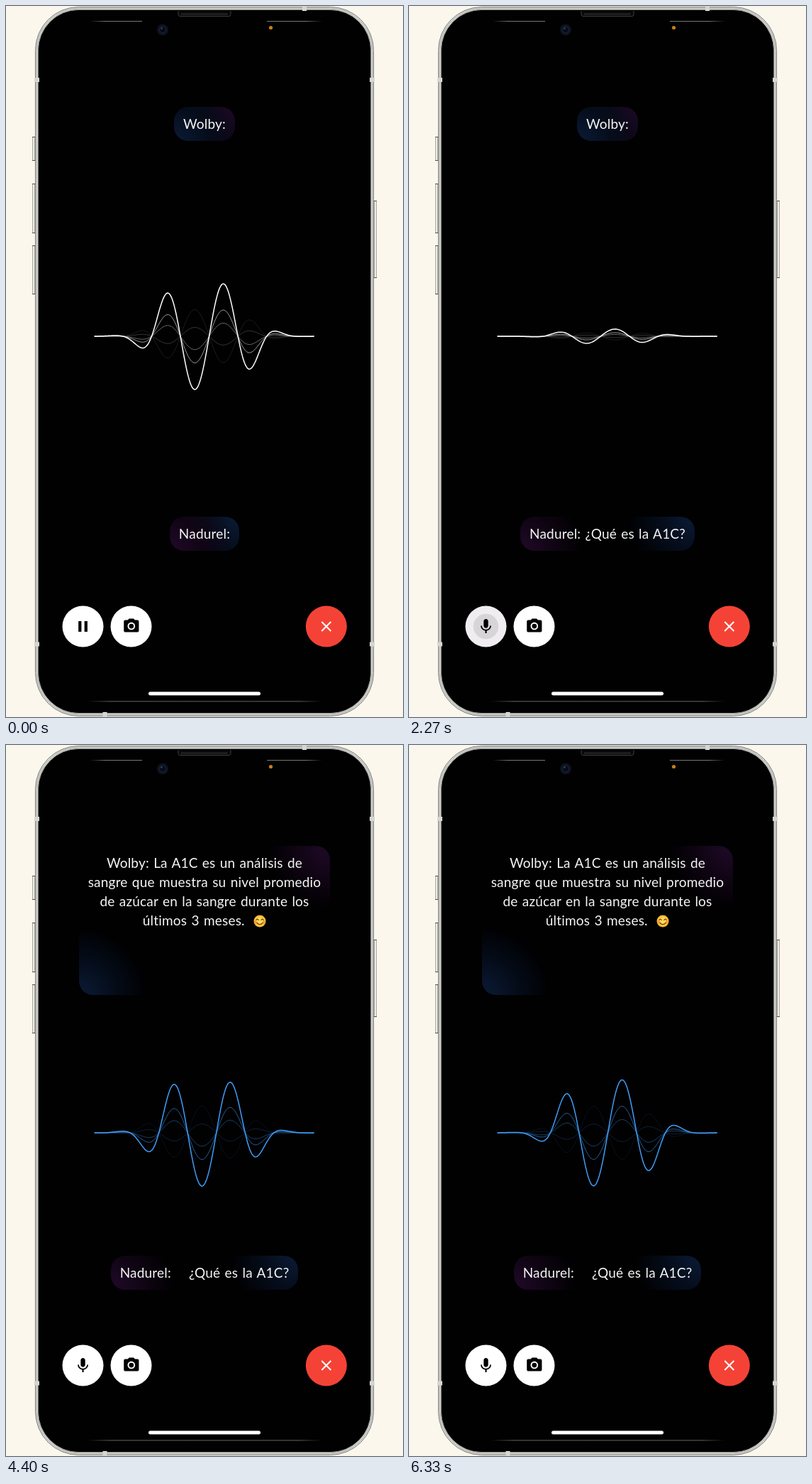
Recreate the animation shown at these times as an HTML page. Size 560 by 1001 pixels, loop 6.39 s.

```html
<!DOCTYPE html>
<html lang="es">
<meta charset="utf-8">
<title>Voice assistant</title>
<style>
  html, body { margin: 0; width: 100%; height: 100%; overflow: hidden; background: #fbf7ed; }
  #stage { position: relative; width: 560px; height: 1001px; overflow: hidden; }
  #stage > svg { position: absolute; left: 0; top: 0; }
  .bubble {
    position: absolute; left: 0; right: 0; margin: auto; width: fit-content; height: 48px;
    box-sizing: border-box; padding: 9.5px 13px; border-radius: 20px;
    font: 19px/27px Lato, "Open Sans", sans-serif; letter-spacing: .2px; word-spacing: 1.2px;
    color: #f5f5f5; text-align: center; white-space: pre;
    --blue: #0b1b36, #050d1b 50%, transparent;
    --plum: #21092a, #110515 50%, transparent;
  }
  #bot { top: 142px; background:
    radial-gradient(circle 96px at 0 100%, var(--blue)),
    radial-gradient(circle 90px at 100% 0, var(--plum)); }
  #user { top: 719px; background:
    radial-gradient(circle 90px at 0 100%, var(--plum)),
    radial-gradient(circle 96px at 100% 0, var(--blue)); }
  .smile { width: 18px; height: 18px; vertical-align: -3px; }
</style>
<div id="stage">
  <svg width="560" height="1001" fill="none">
    <defs>
      <linearGradient id="fadeL"><stop stop-color="#000"/><stop offset=".3" stop-color="#777"/></linearGradient>
      <linearGradient id="fadeR"><stop offset=".7" stop-color="#777"/><stop offset="1" stop-color="#000"/></linearGradient>
      <linearGradient id="fadeB"><stop stop-color="#000"/><stop offset=".1" stop-color="#666"/><stop offset=".9" stop-color="#666"/><stop offset="1" stop-color="#000"/></linearGradient>
      <radialGradient id="face"><stop offset=".4" stop-color="#ffdc55"/><stop offset="1" stop-color="#fbb32c"/></radialGradient>
    </defs>
    <!-- side buttons -->
    <path d="M39 184v34M39 250v70M39 337v69M521 274v109" stroke="#a9a8a3" stroke-width="4"/>
    <path d="M39 185v32M39 251v68M39 338v67M521 275v107" stroke="#efede6" stroke-width="2"/>
    <path d="M37 184.500h4m-4 33h4M37 250.500h4m-4 69h4M37 337.500h4m-4 68h4M519 274.500h4m-4 108h4" stroke="#4c4c4a"/>
    <!-- body -->
    <rect x="41.500" y="1.500" width="477" height="998" rx="61" fill="#e3e3de" stroke="#747472"/>
    <rect x="43.500" y="3.500" width="473" height="994" rx="59" stroke="#a5a5a1"/>
    <rect x="45.500" y="5.500" width="469" height="990" rx="57" fill="#010102" stroke="#6a6a68"/>
    <path d="M40 104h7M513 104h7M40 898.500h7M513 898.500h7M421 0v7M139.500 994v7" stroke="#d6d6d2" stroke-width="6"/>
    <rect x="118" y="21" width="74" height="1" fill="url(#fadeL)"/>
    <rect x="368" y="21" width="78" height="1" fill="url(#fadeR)"/>
    <rect x="115" y="978.500" width="331" height="1" fill="url(#fadeB)"/>
    <path d="M243 7v5q0 2.500 3 2.500h68q3 0 3-2.500v-5" fill="#080808" stroke="#3c3c3c"/>
    <path d="M247 11.500h66" stroke="#333" stroke-width="3" stroke-dasharray="1 1"/>
    <circle cx="221" cy="33.500" r="8" fill="#0e121b"/>
    <circle cx="221" cy="33.500" r="4.500" fill="#070b15" stroke="#1b2a45"/>
    <circle cx="219.500" cy="31.500" r="1.300" fill="#2c4470"/>
    <circle cx="373.500" cy="30.500" r="2.600" fill="#c67d17"/>
    <rect x="201" y="965.500" width="158" height="5" rx="2.500" fill="#fff"/>
    <!-- controls -->
    <circle id="talk" cx="108.500" cy="873.500" r="29" fill="#fff"/>
    <circle id="ripple" cx="108.500" cy="873.500" r="0" fill="#000"/>
    <circle cx="176.500" cy="873.500" r="29" fill="#fff"/>
    <circle cx="451.800" cy="873.500" r="29" fill="#f44336"/>
    <g fill="#000">
      <path id="talkIcon" transform="translate(95.800 860.800) scale(1.060)"/>
      <path transform="translate(164.100 860.300) scale(1.060)" fill-rule="evenodd" d="M9 2L7.170 4H4c-1.100 0-2 .9-2 2v12c0 1.100.9 2 2 2h16c1.100 0 2-.9 2-2V6c0-1.100-.9-2-2-2h-3.170L15 2H9zm3 15c-2.760 0-5-2.240-5-5s2.240-5 5-5 5 2.240 5 5-2.240 5-5 5zm0-1.800a3.200 3.200 0 1 0 0-6.400 3.200 3.200 0 0 0 0 6.400z"/>
    </g>
    <path d="M445.300 867l13 13m0-13l-13 13" stroke="#fff" stroke-width="2"/>
    <g id="waves"></g>
  </svg>
  <div class="bubble" id="bot"></div>
  <div class="bubble" id="user"></div>
</div>
<script>
const $ = id => document.getElementById(id);
const LOOP = 6390, STEP = 1000 / 15;
const CLICK = 1950, REPLY = 3000, TYPE = 3705;

const PAUSE = 'M6 19h4V5H6v14zm8-14v14h4V5h-4z';
const MIC = 'M12 14c1.660 0 3-1.340 3-3V5c0-1.660-1.340-3-3-3S9 3.340 9 5v6c0 1.660 1.340 3 3 3zm5.300-3c0 3-2.540 5.100-5.300 5.100S6.700 14 6.700 11H5c0 3.410 2.720 6.230 6 6.720V21h2v-3.280c3.280-.48 6-3.300 6-6.720h-1.700z';
const SMILE = `<svg class="smile" viewBox="0 0 18 18" fill="none" stroke="#6b3a12" stroke-linecap="round">
  <circle cx="9" cy="9" r="8.500" fill="url(#face)" stroke="none"/>
  <g fill="#f0783c" stroke="none" opacity=".6"><circle cx="3.500" cy="10.500" r="2"/><circle cx="14.500" cy="10.500" r="2"/></g>
  <path d="M3.800 7.500q1.700-2.800 3.400 0m3.600 0q1.700-2.800 3.400 0M5 11.500q4 4.200 8 0" stroke-width="1.200"/></svg>`;

const ANSWER = ('La A1C es un análisis de\nsangre que muestra su nivel promedio\n' +
  'de azúcar en la sangre durante los\núltimos 3 meses.  @').split(/(?<=\s)(?=\S)/);
const QUESTION = ['¿Qué', 'es', 'la', 'A1C?'];

// Each curve: [attenuation, opacity, line width]
const curves = [[-2, .1, 1], [-6, .2, 1], [4, .4, 1], [2, .6, 1], [1, 1, 1.5]].map(([att, opacity, width]) => {
  const path = document.createElementNS('http://www.w3.org/2000/svg', 'path');
  path.setAttribute('stroke-width', width);
  path.setAttribute('stroke-opacity', opacity);
  $('waves').append(path);
  return { path, att };
});

const clamp = (v, lo, hi) => Math.min(hi, Math.max(lo, v));
const decay = ms => .9 ** (ms * .06);

function set(id, html) {
  const el = $(id);
  if (el.shown !== html) el.innerHTML = el.shown = html;
}

function drawWave(t, y0) {
  const blue = t >= REPLY;
  const amp = 75 * (blue ? 1 - decay(t - REPLY) : t > CLICK ? decay(t - CLICK) : 1);
  const phase = (blue ? .07 : .54) + t * 2 * Math.PI / (5 * STEP);
  $('waves').setAttribute('stroke', blue ? '#409cf5' : '#fff');
  for (const { path, att } of curves) {
    let d = '';
    for (let px = -155; px <= 155; px += 1.25) {
      const x = px / 77.5;
      const y = amp / att * (4 / (4 + x ** 4)) ** 4 * Math.sin(6 * x - phase);
      d += (d ? 'L' : 'M') + (279.6 + px).toFixed(2) + ' ' + (y0 - y).toFixed(2);
    }
    path.setAttribute('d', d);
  }
}

function drawButton(t) {
  const age = t - CLICK, pressed = age >= 0;
  const fade = clamp((age - 550) / 400, 0, 1);
  $('talkIcon').setAttribute('d', pressed ? MIC : PAUSE);
  $('talk').setAttribute('fill', pressed && fade < 1 ? '#efedf0' : '#fff');
  const p = clamp(age / 550, 0, 1);
  $('ripple').setAttribute('r', 29 * p * p * (3 - 2 * p));
  $('ripple').setAttribute('opacity', .1 * (1 - fade));
}

function draw(t) {
  const said = clamp(Math.floor((t - 1000) / 200), 0, 4);
  const gap = t < 2600 ? ' ' : '    ';
  set('user', 'Nadurel:' + (said ? gap + QUESTION.slice(0, said).join(' ') : ''));

  const count = clamp(Math.floor((t - TYPE) / 30) + 1, 0, ANSWER.length);
  const text = ('Wolby: ' + ANSWER.slice(0, count).join('')).trimEnd();
  const shift = 27 * (text.split('\n').length - 1);
  set('bot', text.replace('@', SMILE));
  $('bot').style.height = 48 + 2 * shift + 'px';

  drawWave(t, 465 + shift);
  drawButton(t);
}

const start = performance.now();
function tick() {
  const t = (performance.now() - start) % LOOP;
  draw(Math.floor((t + 4) / STEP) * STEP);
  requestAnimationFrame(tick);
}
tick();
</script>
</html>
```
